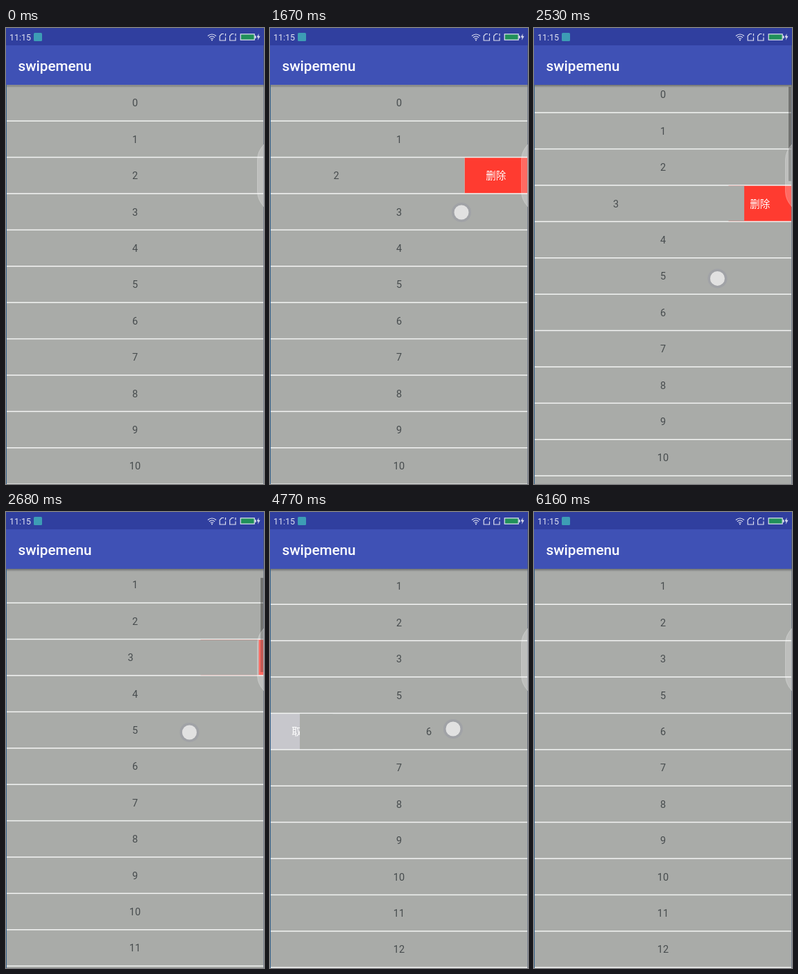
Recreate the animation shown at these times as an HTML page. Size 372x658 px, loop 6750 ms.

```html
<!DOCTYPE html>
<html lang="en">
<head>
<meta charset="utf-8">
<title>Swipe list</title>
<style>
  html, body { margin: 0; width: 100%; height: 100%; overflow: hidden; background: #f3f4f3; }
  svg { display: block; width: 100vw; height: 100vh; }
  text { font-family: Roboto, "Noto Sans CJK SC", sans-serif; }
  .label { font-size: 14.5px; fill: #474c4e; text-anchor: middle; }
  .action { font-size: 14.5px; fill: #fff; text-anchor: middle; font-family: "Noto Sans CJK SC", "Noto Sans CJK", sans-serif; }
</style>
</head>
<body>
<svg viewBox="0 0 372 658">
  <defs>
    <linearGradient id="shade" x2="0" y2="1">
      <stop offset="0" stop-color="#000" stop-opacity=".34"/>
      <stop offset="1" stop-color="#000" stop-opacity="0"/>
    </linearGradient>
  </defs>
  <rect width="372" height="658" fill="#f3f4f3"/>
  <g id="list"></g>
  <rect id="scrollbar" x="367" width="4" height="136" fill="#000" opacity="0"/>
  <rect y="82" width="372" height="4" fill="url(#shade)"/>
  <rect y="25" width="372" height="57" fill="#3f51b5"/>
  <rect width="372" height="25" fill="#303f9f"/>
  <text x="17.5" y="61.5" font-size="20.67" font-weight="500" fill="#fff">swipemenu</text>

  <text x="5" y="17.7" font-size="12.4" fill="#dfe2f2">11:15</text>
  <rect x="40" y="7" width="12" height="12" rx="1.5" fill="#3d9db5"/>
  <g fill="none" stroke="#dfe2f2" stroke-width="1.2">
    <path d="M291 11.5q6-5 12 0M293 13.7q4-3.4 8 0M295 15.8q2-1.6 4 0"/>
    <path id="sim" d="M316.5 13.5V18h-8.3v-6.5l2.8-3h3M316.5 8v3.5"/>
    <path d="M331 13.5V18h-8.3v-6.5l2.8-3h3M331 8v3.5"/>
    <rect x="338.2" y="8.8" width="20" height="8.4" fill="#21905a"/>
  </g>
  <circle cx="297" cy="17.4" r="1" fill="#dfe2f2"/>
  <path d="M359 11h1.5v4H359zM364.5 8l-3 5.6h2.2l-.8 4.2 3.6-6h-2.3z" fill="#dfe2f2"/>

  <path d="M0 82V658" stroke="#35618a" stroke-width="2"/>
  <path d="M371.6 25V658" stroke="#4b5568" stroke-width=".8"/>
  <path d="M372 168Q362.5 178 362.5 190V236Q362.5 248 372 258Z" fill="#fff" fill-opacity=".24" stroke="#fff" stroke-opacity=".25"/>
  <g id="touch">
    <circle r="14" fill="#9d9fa6" fill-opacity=".75"/>
    <circle r="10.5" fill="#e1e1e1"/>
  </g>
</svg>
<script>
const LOOP = 6750, TOP = 82.5, PITCH = 52.4, WIDTH = 371, MENU = 90.5, SCROLLED = 53.3;
const byId = id => document.getElementById(id);

const gesture = (from, to, steps) => ({ from, to, steps });
const openTwo = gesture(820, 1370, 8);
const openThree = gesture(1670, 2300, 9);
const scrollUp = gesture(2450, 2910, 7);
const openFour = gesture(3070, 3680, 9);
const removeFour = gesture(3920, 4300, 6);
const openSix = gesture(4610, 5150, 8);
const closeSix = gesture(5600, 6160, 8);

// Progress of each kind of movement, one value per refresh
const SWIPE = [0, .12, .475, .84, .983, 1];
const SETTLE = [0, .14, .55, .85, .967, 1];
const SNAP = [0, .25, .7, .928, .99, 1];
const PRESS = [0, 0, .3, .75, .96, 1];
const SCROLL = [0, 12, 40, 55.4, 54.2, SCROLLED];
const BAR_FADE = [1, .7, .3, 0];
const FINGER = [0, 14, 58, 92];

// The picture refreshes in discrete steps during a gesture; -1 means not begun
function stepOf({ from, to, steps }, t) {
  const k = Math.floor((t + 2 - from) / (to - from) * (steps - 1));
  return Math.max(-1, Math.min(steps - 1, k));
}
const at = (values, k) => values[Math.max(0, Math.min(k, values.length - 1))];

// Finger drags: gesture, start point, direction
const drags = [
  [openTwo, 276, 214, -1],
  [openThree, 276, 266, -1],
  [openFour, 274, 265, -1],
  [openSix, 206, 313, 1],
  [closeSix, 276, 316, -1]
];

function touchPoint(t) {
  for (const [g, x, y, dir] of drags) {
    const k = stepOf(g, t);
    if (k >= 0 && k < FINGER.length) return [x + dir * FINGER[k], y];
  }
  const s = stepOf(scrollUp, t);
  if (s >= 0 && s < 5) return [264.5, 373.4 - SCROLL[s]];
  const r = stepOf(removeFour, t);
  return r === 0 || r === 1 ? [326, 265] : null;
}

function rowOffsets(t) {
  const move = (values, g) => MENU * at(values, stepOf(g, t));
  return {
    2: move(SETTLE, openThree) - move(SWIPE, openTwo),
    3: move(SNAP, scrollUp) - move(SWIPE, openThree),
    4: move(PRESS, removeFour) - move(SWIPE, openFour),
    6: move(SWIPE, openSix) - move(SETTLE, closeSix)
  };
}

const rows = Array.from({ length: 13 }, (_, i) => {
  const row = document.createElementNS("http://www.w3.org/2000/svg", "g");
  const height = PITCH - 1.5;
  row.innerHTML = `
    <g><rect x="${WIDTH - MENU}" width="${MENU}" height="${height}" fill="#ff3b30"/>
      <text class="action" x="${WIDTH - MENU / 2}" y="31">删除</text></g>
    <g><rect width="${MENU}" height="${height}" fill="#c7c7cc"/>
      <text class="action" x="${MENU / 2 + .5}" y="31">取消</text></g>
    <g><rect width="${WIDTH}" height="${height}" fill="#a9aba8"/>
      <text class="label" x="186" y="30.9"></text></g>`;
  byId("list").append(row);
  const [right, left, face] = row.children;
  return { row, right, left, face, label: face.querySelector("text"), slot: i };
});

const show = (el, on) => el.setAttribute("display", on ? "inline" : "none");

function draw(t) {
  const offsets = rowOffsets(t);
  const scrollStep = stepOf(scrollUp, t);
  const scroll = at(SCROLL, scrollStep);
  const removed = stepOf(removeFour, t) >= 2;

  for (const { row, right, left, face, label, slot } of rows) {
    const number = removed && slot >= 4 ? slot + 1 : slot;
    // The reused fourth row finishes closing after its number has changed
    const offset = (removed && slot === 4 ? offsets[4] : offsets[number]) || 0;
    row.setAttribute("transform", `translate(0 ${TOP + slot * PITCH - scroll})`);
    face.setAttribute("transform", `translate(${offset} 0)`);
    label.textContent = number;
    show(right, offset < -.01);
    show(left, offset > .01);
  }

  const bar = byId("scrollbar");
  bar.setAttribute("y", 82 + scroll * .236);
  bar.setAttribute("opacity", scrollStep > 0 ? .33 * at(BAR_FADE, stepOf(openFour, t)) : 0);

  const point = touchPoint(t);
  show(byId("touch"), point);
  if (point) byId("touch").setAttribute("transform", `translate(${point})`);
}

const start = performance.now();
function tick() {
  draw((performance.now() - start) % LOOP);
  requestAnimationFrame(tick);
}
tick();
</script>
</body>
</html>
```
